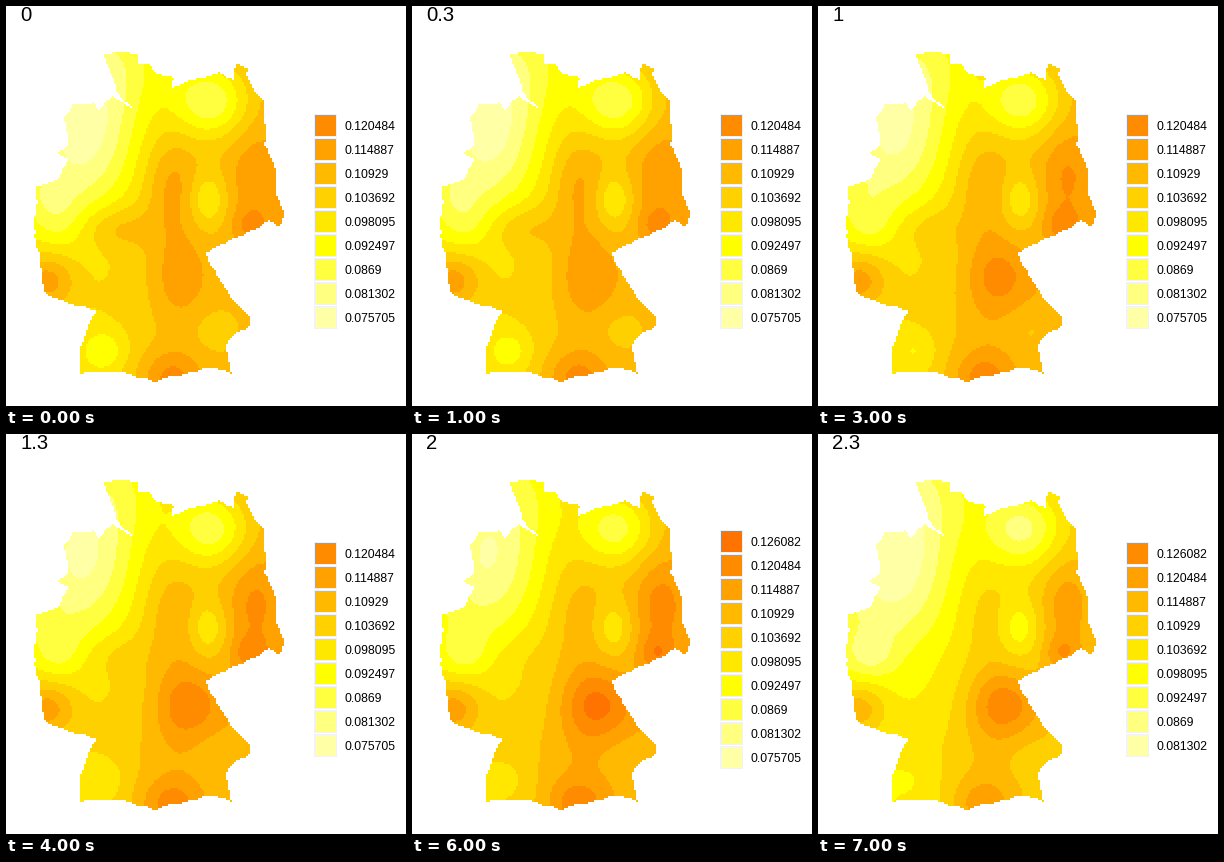
Write a matplotlib script that moves like this. It is 400 px wide and 400 px high and loops after 8000 ms.

```python
import numpy as np
import matplotlib.pyplot as plt
from matplotlib.animation import FuncAnimation
from matplotlib.colors import to_rgb
from matplotlib.patches import Rectangle
from matplotlib.path import Path

SIZE, DPI = 400, 100
PX = 72 / DPI
STEPS = 8
CELL = 2
LOW, STEP = 0.075705, 0.00559742
FONT = ["Liberation Sans", "DejaVu Sans"]

# Pale yellows first, then pure yellow shading to orange.
PALETTE = np.array([to_rgb(c) for c in ("#ffffa5", "#ffff80", "#ffff40")]
                   + [(1, g / 255, 0) for g in np.linspace(255, 116, 7)])

# Key corners of the border, clockwise from the north-west.
CORNERS = [
    (58, 112), (66, 99), (88, 97), (93, 104), (107, 90), (128, 103),
    (110, 86), (104, 63), (97, 48), (112, 46), (131, 47), (133, 58),
    (144, 58), (148, 66), (168, 72), (166, 82), (192, 72), (213, 66),
    (228, 74), (231, 57), (242, 63), (240, 69), (258, 95), (261, 126),
    (258, 138), (268, 158), (271, 190), (279, 208), (274, 221), (263, 214),
    (238, 229), (199, 247), (213, 273), (244, 310), (243, 322), (231, 326),
    (220, 341), (225, 367), (203, 361), (150, 376), (116, 366), (74, 368),
    (74, 342), (91, 306), (55, 294), (40, 288), (34, 258), (28, 213),
    (30, 180), (52, 173), (62, 153), (52, 148), (61, 140),
]

# Hills and hollows: x, y, x spread, y spread, height at start and end.
BUMPS = [
    (78, 125, 39, 60, -4.5, -3.8),
    (120, 50, 40, 40, -1.9, -1.2),
    (205, 95, 26, 25, -3.9, -3.4),
    (42, 192, 20, 18, -1.2, 0.0),
    (52, 220, 17, 17, -0.9, -1.6),
    (110, 222, 25, 16, 1.6, 0.1),
    (165, 180, 18, 32, 1.7, 0.7),
    (202, 194, 13, 19, -2.1, -1.7),
    (248, 172, 18, 32, 1.3, 2.1),
    (245, 220, 14, 13, 1.6, 2.0),
    (172, 270, 20, 35, 1.7, 1.2),
    (192, 270, 26, 24, 0.2, 2.7),
    (40, 275, 20, 19, 3.0, 3.0),
    (98, 345, 16, 16, -1.9, -0.5),
    (165, 372, 22, 20, 2.6, 2.6),
    (165, 330, 55, 35, 0.0, 0.9),
    (212, 324, 18, 16, -0.7, -0.4),
]


def roughen(points, rounds=3, amount=0.07):
    """Split every side and push its middle sideways at random."""
    rng = np.random.default_rng(4)
    pts = np.array(points, float)
    for _ in range(rounds):
        side = np.roll(pts, -1, axis=0) - pts
        normal = np.column_stack([-side[:, 1], side[:, 0]])
        push = rng.uniform(-amount, amount, (len(pts), 1))
        middle = pts + side / 2 + normal * push
        pts = np.stack([pts, middle], axis=1).reshape(-1, 2)
    return pts


def surface(x, y, p):
    """Level at progress p: a slope rising to the east plus the bumps."""
    level = 5.6 + 0.009 * (x - 150)
    for cx, cy, sx, sy, h0, h1 in BUMPS:
        bell = np.exp(-((x - cx) / sx) ** 2 / 2 - ((y - cy) / sy) ** 2 / 2)
        level = level + (h0 + (h1 - h0) * p) * bell
    return level


gx, gy = np.meshgrid(np.arange(20, 286, CELL) + CELL / 2,
                     np.arange(38, 386, CELL) + CELL / 2)
cells = np.column_stack([gx.ravel(), gy.ravel()])
inside = Path(roughen(CORNERS)).contains_points(cells).reshape(gx.shape)

fig = plt.figure(figsize=(SIZE / DPI, SIZE / DPI), dpi=DPI, facecolor="white")
ax = fig.add_axes([0, 0, 1, 1])
ax.axis("off")
land = ax.imshow(np.ones(gx.shape + (3,)), interpolation="nearest",
                 extent=(20, 286, 386, 38))
ax.set(xlim=(0, SIZE), ylim=(SIZE, 0), aspect="auto")
clock = ax.text(14, 14.7, "", family=FONT, size=20.3 * PX, va="baseline")

keys = []
for _ in PALETTE:
    box = ax.add_patch(Rectangle((308, 0), 22, 22, ec="#f2f2f2", lw=PX))
    label = ax.text(338.2, 0, "", family=FONT, size=12.2 * PX, va="baseline")
    keys.append((box, label))


def draw(i):
    low = 1 if i == STEPS - 1 else 0
    high = 9 if i >= 5 else 8
    value = surface(gx, gy, i / (STEPS - 1))
    level = np.clip(np.floor(value), low, high).astype(int) - low
    land.set_data(np.where(inside[..., None], PALETTE[level], 1.0))
    clock.set_text(f"{round(i / 3, 1):g}")

    rows = high - low + 1
    for k, (box, label) in enumerate(keys):
        box.set_visible(k < rows)
        label.set_visible(k < rows)
        mid = 215 + 12 * (rows - 1) - 24 * k
        box.set_y(mid - 11)
        box.set_facecolor(PALETTE[k])
        label.set_y(mid + 4.5)
        label.set_text(f"{LOW + STEP * (low + k):.6f}".rstrip("0"))
    return [land, clock]


anim = FuncAnimation(fig, draw, frames=STEPS, interval=1000, repeat=True,
                     repeat_delay=0, blit=False)
plt.show()
```
